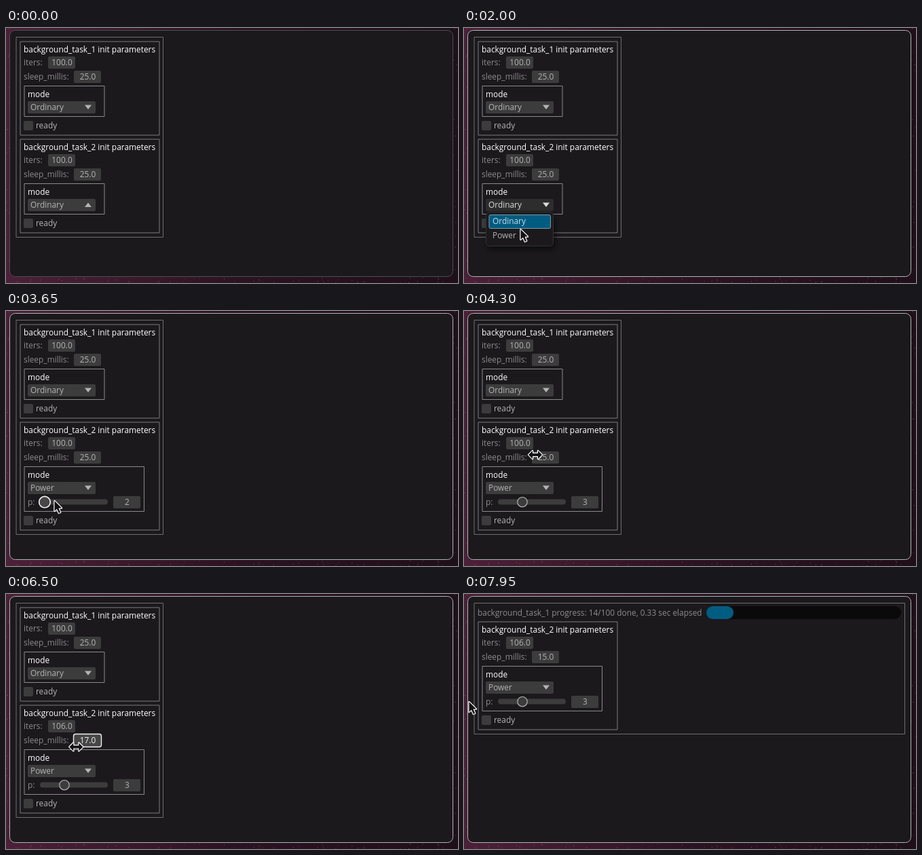
Write an HTML page with a canvas that moves like this. It is 666x376 px and loops after 8000 ms.

```html
<!DOCTYPE html>
<html lang="en">
<head>
<meta charset="utf-8">
<title>Background task parameters</title>
<style>
html, body { margin: 0; width: 100%; height: 100%; overflow: hidden; background: #2a1320; }
canvas { display: block; }
</style>
</head>
<body>
<canvas id="stage" width="666" height="376"></canvas>
<script>
const g = document.getElementById('stage').getContext('2d');
const LOOP = 8000, STEP = 50;
const PANEL = '#1b191c', WIDGET = '#3c3c3c', HOVER = '#464646', BLUE = '#005c80';
const DIM = '#8c8c8c', TEXT = '#b4b4b4', HOT = '#f0f0f0', FRAME = '#7c7c7c', OUTER = '#6e6e6e';

// Moments of the interaction, in ms
const OPEN = 1700, PICK = 2350, START = 7650;

// Pointer moves: start, end, x, y; it rests in between
const moves = [
  [950, 1650, 84, 264], [1800, 2000, 83, 296], [2000, 2200, 75, 303], [2350, 2850, 62, 279],
  [3150, 3450, 71, 279], [3650, 3850, 88, 280], [4000, 4300, 105, 212], [4300, 4800, 88, 190],
  [5250, 5500, 121, 195], [5750, 5950, 130, 216], [6150, 6650, 96, 228],
  [6950, 7600, 53, 143], [7700, 7950, 7, 158]
];

// Eased 0 to 1 between two times
function ramp(t, a, b) {
  const u = Math.max(0, Math.min(1, (t - a) / (b - a)));
  return u * u * (3 - 2 * u);
}

const pointer = t => moves.reduce(([px, py], [a, b, x, y]) => {
  const u = ramp(t, a, b);
  return [px + (x - px) * u, py + (y - py) * u];
}, [150, 385]);

const within = (t, a, b) => t >= a && t < b;

function text(s, x, y, color, align = 'left') {
  g.fillStyle = color;
  g.textAlign = align;
  g.fillText(s, x, y);
}

function paint(fill, stroke, line) {
  if (fill) { g.fillStyle = fill; g.fill(); }
  if (stroke) { g.strokeStyle = stroke; g.lineWidth = line; g.stroke(); }
}

function box(x, y, w, h, r, fill, stroke, line = 1) {
  g.beginPath();
  g.roundRect(x, y, w, h, r);
  paint(fill, stroke, line);
}

function shape(points, fill, outline) {
  g.beginPath();
  points.forEach(p => g.lineTo(...p));
  g.closePath();
  paint(null, outline, 2.4);
  paint(fill);
}

// A filled widget that gains a bright rim while hovered
function widget(x, y, w, h, hot) {
  if (hot) box(x - .5, y - .5, w + 1, h + 1, 3, HOVER, HOT, 1.4);
  else box(x, y, w, h, 2, WIDGET);
}

function field(value, x, y, hot) {
  widget(x, y, 40, 18, hot);
  text(value, x + 20.5, y + 13, hot ? HOT : TEXT, 'center');
}

function combo(label, open, up) {
  const color = open ? '#dcdcdc' : TEXT;
  box(32, 108, 100, 18, 2, open ? '#2d2d2d' : WIDGET);
  text(label, 36, 121, color);
  const dir = up ? -3.2 : 3.2;
  shape([[116, 116.8 - dir], [126, 116.8 - dir], [121, 116.8 + dir]], color);
}

function slider(p, hot) {
  text('p:', 32, 142, DIM);
  box(50, 133.5, 100, 8, 4, WIDGET);
  g.beginPath();
  g.arc(p === 2 ? 57 : 86, 137.7, hot ? 8.3 : 7.2, 0, 7);
  paint(hot ? HOVER : WIDGET, hot ? HOT : TEXT, hot ? 1.7 : 1.2);
  field(p, 158, 129);
}

function group(y, s) {
  const extra = s.power ? 21 : 0, ready = s.hot === 'ready';
  g.save();
  g.translate(0, y);
  box(21, 20, 205, 138 + extra, 0, null, FRAME);
  text(`background_task_${s.id} init parameters`, 26, 36, '#fff');
  text('iters:', 26, 55, DIM);
  field(s.iters.toFixed(1), 62, 42, s.hot === 'iters');
  text('sleep_millis:', 26, 76, DIM);
  field(s.sleep.toFixed(1), 100, 63, s.hot === 'sleep');
  box(27, 85.5, s.power ? 176.5 : 118, 45 + extra, 0, null, '#8a8a8a');
  text('mode', 32, 102, '#fff');
  combo(s.power ? 'Power' : 'Ordinary', s.open, s.up);
  if (s.power) slider(s.p, s.hot === 'slider');
  widget(26, 137 + extra, 14, 14, ready);
  text('ready', 44, 148 + extra, ready ? HOT : TEXT);
  g.restore();
}

function popup(y) {
  g.save();
  g.shadowColor = 'rgba(0,0,0,.6)';
  g.shadowBlur = 10;
  g.shadowOffsetX = 3;
  g.shadowOffsetY = 5;
  box(32.5, 271.5, 99, 50, 5, PANEL);
  g.restore();
  box(32.5, 271.5, 99, 50, 5, null, '#333');
  const low = y > 297, high = y > 274 && !low;
  box(37, 275.5, 90.5, 20, 2, BLUE, high && '#7f9aa5');
  text('Ordinary', 42, 289, '#c4dde8');
  if (low) box(37, 296.5, 90.5, 20, 2, HOVER, '#969696');
  text('Power', 42, 310, low ? HOT : TEXT);
}

function progress(t) {
  const sec = .33 + (t - 7950) / 1000;
  const done = Math.floor(sec / .0235);
  text(`background_task_1 progress: ${done}/100 done, ${sec.toFixed(2)} sec elapsed`, 20, 32, DIM);
  box(357, 18, 287, 19, 9.5, '#0a0a0a');
  box(357, 18, Math.max(19, 2.87 * done), 19, 9.5, BLUE);
}

function cursor(x, y, resize) {
  g.save();
  g.translate(x, y);
  g.lineJoin = 'round';
  const points = resize
    ? [[-10, 0], [-4, -6], [-4, -2], [4, -2], [4, -6], [10, 0], [4, 6], [4, 2], [-4, 2], [-4, 6]]
    : [[.5, 1], [.5, 16], [4, 12.7], [6.8, 19], [9.2, 18], [6.5, 11.8], [11, 11.5]];
  shape(points, '#111', '#fff');
  g.restore();
}

function backdrop(t) {
  const grad = g.createLinearGradient(0, 0, 666, 0);
  ['#4c2038', '#2c1321', '#1f0f19'].forEach((c, i) => grad.addColorStop(i / 2, c));
  g.fillStyle = grad;
  g.fillRect(0, 0, 666, 376);
  let seed = 7;
  const rnd = () => (seed = seed * 16807 % 2147483647) / 2147483647;
  for (let i = 0; i < 150; i++) {
    g.fillStyle = `rgba(225,180,200,${.5 * rnd()})`;
    const u = rnd(), v = rnd();
    if (i % 3) g.fillRect(u * 666, 368 + v * 8, 1, 1);
    else g.fillRect((659 + v * 12) % 666, u * 376, 1, 1);
  }
  // The window edge brightens when it gains focus
  const focus = ramp(t, 500, 800);
  box(5.5, 3.5, 653, 363, 8, PANEL, `rgb(${[72, 80, 82].map(c => c + 100 * focus)})`);
}

function draw(t) {
  const [x, y] = pointer(t);
  const open = within(t, OPEN, PICK), power = t >= PICK;
  g.font = '11.9px "Open Sans", "Noto Sans", sans-serif';
  backdrop(t);

  const hot = within(t, 2750, 4050) ? 'slider'
    : within(t, 4600, 5800) ? 'iters'
    : within(t, 5850, 6950) ? 'sleep' : '';
  const second = {
    id: 2, power, open, hot, up: t < OPEN,
    p: t < 3700 ? 2 : 3,
    iters: 100 + Math.round(6 * ramp(t, 5250, 5500)),
    sleep: 25 - Math.round(10 * ramp(t, 6150, 6650))
  };

  if (t >= START) {
    box(15, 13.5, 634.5, 193, 0, null, OUTER);
    progress(t);
    group(21, second);
  } else {
    box(15, 13.5, 216.5, power ? 316 : 295, 0, null, OUTER);
    group(0, { id: 1, iters: 100, sleep: 25, hot: t >= 7450 ? 'ready' : '' });
    group(144, second);
  }
  if (open) popup(y);
  cursor(x, y, within(t, 4250, 7000));
}

function tick(now) {
  draw(Math.floor(now % LOOP / STEP) * STEP);
  requestAnimationFrame(tick);
}
requestAnimationFrame(tick);
</script>
</body>
</html>
```
